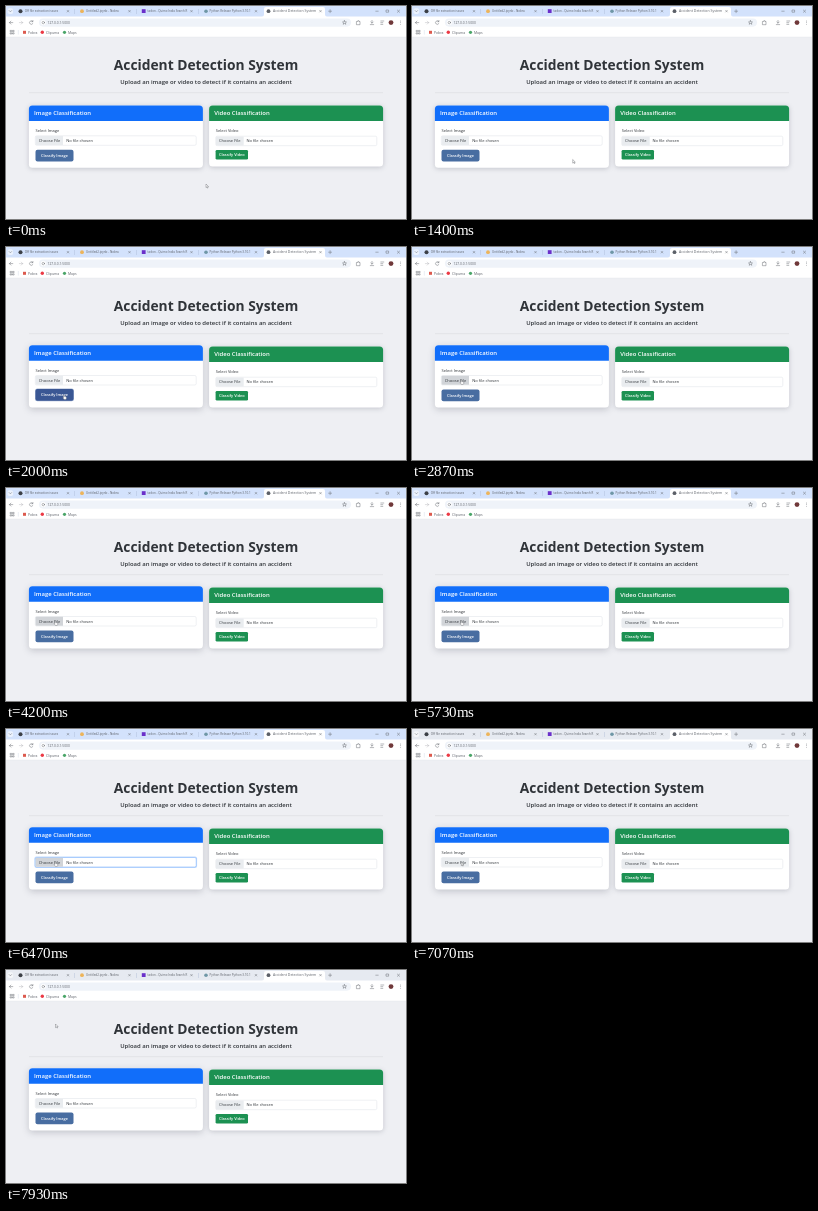
Write an HTML page that moves like this. It is 400 by 213 pixels and loops after 8000 ms.

```html
<!DOCTYPE html>
<html lang="en">
<head>
<meta charset="utf-8">
<title>Accident Detection System</title>
<style>
  html, body { margin: 0; width: 100%; height: 100%; overflow: hidden; background: #eeeff3; }
  svg { display: block; width: 100%; height: 100%; }
  text { font-family: "Open Sans", "Noto Sans", sans-serif; fill: #303439; }
  #browser text { fill: #5c6068; }
  .bold { font-weight: 700; }
  .semi { font-weight: 600; }
  .white { fill: #fff; }
  .icon { fill: none; stroke: #6a6e75; stroke-width: .5; stroke-linecap: round; stroke-linejoin: round; }
  .card { filter: drop-shadow(0 1.8px 2.9px rgba(20, 25, 45, .2)); }
</style>
</head>
<body>
<svg viewBox="0 0 400 213" preserveAspectRatio="none">
  <rect width="400" height="213" fill="#eeeff3"/>

  <g id="browser">
    <rect id="strip" width="400" height="14"/>
    <path d="M0 10.5H256Q258 10.5 258 8.5V3Q258 1 260 1H317Q319 1 319 3V8.5Q319 10.5 321 10.5H400V31H0Z" fill="#fff"/>
    <rect x="1.5" y="2.2" width="5.6" height="5.8" rx="1.8" fill="#fff" opacity=".55"/>
    <path class="icon" d="M3.2 4.6l1.2 1.2 1.2-1.2M322.6 5.2h3M324.1 3.7v3M369.8 5.2h2.4M380.4 4h2.2v2.2h-2.2z"/>
    <path d="M68.5 3v5M130.5 3v5M192.5 3v5" stroke="#a9b9d3" stroke-width=".4"/>
    <circle cx="14.5" cy="5.2" r="2" fill="#3c4047"/>
    <circle cx="76" cy="5.2" r="1.9" fill="#edb45a"/>
    <rect x="135.8" y="3.2" width="3.8" height="3.8" fill="#6a2fca"/>
    <circle cx="200" cy="5.2" r="1.8" fill="#6f97a6"/>
    <circle cx="262.5" cy="5.2" r="1.9" fill="#5c6068"/>

    <rect x="33" y="12.5" width="312" height="8.2" rx="4.1" fill="#eff3f9"/>
    <circle cx="37.3" cy="16.6" r="2.5" fill="#fff"/>
    <circle class="icon" cx="37.3" cy="16.6" r="1.2"/>
    <path class="icon" d="M6.8 16.6H3.4M4.9 15.1l-1.5 1.5 1.5 1.5M26.8 15.5a1.8 1.8 0 1 0 .1 2M26.9 14.4v1.3h-1.3
      M338.5 14.6l.6 1.3 1.4.1-1.1.9.4 1.4-1.3-.8-1.3.8.4-1.4-1.1-.9 1.4-.1z
      M350.8 15.5h1v-.8h1.2v.8h1v3.2h-3.2zM366 14.4v2.6M364.8 16l1.2 1.2 1.2-1.2M364.3 18.6h3.4M374.8 15h3M374.8 16.7h2M374.8 18.4h2"/>
    <path class="icon" opacity=".45" d="M13.3 16.6h3.4M15.2 15.1l1.5 1.5-1.5 1.5"/>
    <circle cx="385" cy="16.6" r="2.4" fill="#70393a"/>
    <g fill="#5c6068"><circle cx="394.5" cy="15" r=".4"/><circle cx="394.5" cy="16.6" r=".4"/><circle cx="394.5" cy="18.2" r=".4"/></g>

    <path class="icon" d="M4.5 24.4h1.2v1.2H4.5zM6.9 24.4h1.2v1.2H6.9zM4.5 26.8h1.2V28H4.5zM6.9 26.8h1.2V28H6.9z"/>
    <path d="M12.3 24v4.5" stroke="#d2dae8" stroke-width=".5"/>
    <rect x="17" y="24.8" width="3" height="3" fill="#dc5a4e"/>
    <circle cx="36.3" cy="26.3" r="1.7" fill="#ec3a45"/>
    <circle cx="58.5" cy="26.3" r="1.6" fill="#4aa568"/>
    <path d="M0 31.1H400" stroke="#e3e5ea" stroke-width=".4"/>
  </g>

  <path d="M23 86.7H377" stroke="#d4d6db" stroke-width=".5"/>

  <g id="imageCard">
    <rect id="imageShape" class="card" x="22.9" y="99.5" width="174" height="62.2" rx="3.5" fill="#fff"/>
    <path d="M22.9 115V103Q22.9 99.5 26.4 99.5H193.4Q196.9 99.5 196.9 103V115Z" fill="#116efa"/>
    <rect id="ring" x="28.4" y="128.9" width="162.7" height="11.3" rx="2" fill="#c2dbfe"/>
    <rect id="field" x="29.3" y="129.8" width="160.9" height="9.5" rx="1.4" fill="#fff" stroke-width=".5"/>
    <path id="choose" d="M57 130V139H30.7Q29.6 139 29.6 138V131Q29.6 130 30.7 130Z"/>
    <g id="submit">
      <rect id="buttonRing" x="29" y="143.3" width="39" height="12.6" rx="2.5" fill="#a3b4d2"/>
      <rect id="button" x="29.5" y="143.8" width="38" height="11.7" rx="2"/>
    </g>
  </g>

  <g id="videoCard">
    <rect class="card" x="203.1" y="99.5" width="174" height="61" rx="3.5" fill="#fff"/>
    <path d="M203.1 115V103Q203.1 99.5 206.6 99.5H373.6Q377.1 99.5 377.1 103V115Z" fill="#1c9152"/>
    <rect x="209.8" y="130.2" width="161" height="9.5" rx="1.4" fill="#fff" stroke="#dde1e6" stroke-width=".5"/>
    <path d="M237.7 130.4V139.5H211.2Q210 139.5 210 138.4V131.4Q210 130.4 211.2 130.4Z" fill="#e9ecef"/>
    <rect x="209.6" y="143.9" width="32.4" height="9.7" rx="1.4" fill="#1c9152"/>
  </g>

  <g id="cursor" stroke="#4c4f55" stroke-width=".4" stroke-linejoin="round" fill="#fff">
    <path id="arrow" d="M0 0V4.1L1 3.2L1.7 4.7L2.3 4.4L1.7 3H3Z"/>
    <path id="hand" d="M-.5 .4Q0-.4 .5 .4V1.7Q1 1.4 1.3 1.9Q1.8 1.6 2.1 2.1Q2.7 2 2.8 2.7V3.7Q2.7 4.6 2.2 5H.1Q-.4 4.2-1.4 3.1Q-1.3 2.4-.5 2.9Z"/>
  </g>
</svg>
<script>
const $ = id => document.getElementById(id);
const svg = document.querySelector("svg");

function label(parent, x, y, size, content, className = "") {
  const node = document.createElementNS(svg.namespaceURI, "text");
  node.setAttribute("x", x);
  node.setAttribute("y", y);
  node.setAttribute("font-size", size);
  node.setAttribute("class", className);
  node.textContent = content;
  parent.append(node);
  return node;
}

function closeIcon(x, y, r) {
  const path = document.createElementNS(svg.namespaceURI, "path");
  path.setAttribute("class", "icon");
  path.setAttribute("d", `M${x - r} ${y - r}l${2 * r} ${2 * r}m0 ${-2 * r}l${-2 * r} ${2 * r}`);
  $("browser").append(path);
}

const browser = $("browser");
label(browser, 18.7, 6.4, 3, "Off file extraction issues");
label(browser, 80, 6.4, 3, "Untitled2.ipynb - Nobra");
label(browser, 141.5, 6.4, 2.9, "tavlon - Quimo India Search R");
label(browser, 203.5, 6.4, 3, "Python Release Python 3.10.1");
label(browser, 267, 6.4, 3.5, "Accident Detection System");
[62, 123.5, 185.5, 250, 314.5].forEach(x => closeIcon(x, 5.2, .8));
closeIcon(392.5, 5.2, 1.1);
label(browser, 41.5, 17.8, 3.3, "127.0.0.1:5000");
label(browser, 22, 27.5, 3.4, "Pobra");
label(browser, 40, 27.5, 3.4, "Clipuma");
label(browser, 62, 27.5, 3.4, "Maps");

const title = label(svg, 200, 64.1, 13.8, "Accident Detection System", "bold");
const subtitle = label(svg, 200, 77.9, 5.95, "Upload an image or video to detect if it contains an accident", "semi");
[title, subtitle].forEach(node => node.setAttribute("text-anchor", "middle"));

function cardText(card, x, kind) {
  label(card, x, 109.3, 5.95, `${kind} Classification`, "semi white");
  label(card, x + 1.5, 126.3, 4.05, `Select ${kind}`);
  label(card, x + 4.8, 136.3, 4.05, "Choose File");
  label(card, x + 32.2, 136.3, 4.05, "No file chosen");
}
cardText($("imageCard"), 28, "Image");
cardText($("videoCard"), 208.2, "Video");
label($("submit"), 35, 151.1, 3.95, "Classify Image", "semi white");
label($("videoCard"), 213, 150.2, 3.9, "Classify Video", "semi white");
svg.append($("cursor"));

const LOOP = 8000, TICK = 200 / 3;
const HOVER_CARD = 1430, HOVER_BUTTON = 1800, LEAVE_BUTTON = 2300, HOVER_CHOOSE = 2400;
const FOCUS = 6300, DIALOG = 6530;

// time, x, y of the pointer tip
const pointer = [
  [0, 200, 178], [1333, 200, 178], [1400, 160.7, 153.5], [1867, 60.5, 148],
  [2000, 58, 148], [2267, 57.5, 147.5], [2467, 50, 136], [2733, 50, 136],
  [2867, 49.3, 133], [7400, 49.3, 133], [7933, 49.5, 54]
];

const progress = (t, start, length) => Math.min(1, Math.max(0, (t - start) / length));
const smooth = p => p * p * (3 - 2 * p);

function pointerAt(t) {
  const next = pointer.findIndex(key => key[0] > t);
  if (next < 0) return pointer.at(-1).slice(1);
  const [t0, x0, y0] = pointer[next - 1], [t1, x1, y1] = pointer[next];
  const p = smooth((t - t0) / (t1 - t0));
  return [x0 + (x1 - x0) * p, y0 + (y1 - y0) * p];
}

function mix(a, b, p) {
  return `rgb(${a.map((v, i) => Math.round(v + (b[i] - v) * p))})`;
}

function draw(now) {
  const t = Math.floor((now % LOOP + 4) / TICK) * TICK;
  const lift = smooth(progress(t, HOVER_CARD, 300));
  const press = progress(t, HOVER_BUTTON, 150) - progress(t, LEAVE_BUTTON, 150);
  const choose = progress(t, HOVER_CHOOSE, 150) - progress(t, DIALOG, 150);
  const focus = progress(t, FOCUS, 150) - progress(t, DIALOG, 150);
  const [x, y] = pointerAt(t);
  const overControl = t >= HOVER_BUTTON && t < DIALOG;

  $("imageCard").setAttribute("transform", `translate(0 ${-1.3 * lift})`);
  $("imageShape").style.filter =
    `drop-shadow(0 ${1.8 + lift}px ${2.9 + .6 * lift}px rgba(20,25,45,.2))`;
  $("submit").setAttribute("transform", `translate(0 ${-.4 * press})`);
  $("button").setAttribute("fill", mix([72, 109, 161], [58, 87, 148], press));
  $("buttonRing").setAttribute("opacity", press);
  $("choose").setAttribute("fill", mix([233, 236, 239], [209, 212, 216], choose));
  $("field").setAttribute("stroke", mix([221, 225, 230], [112, 170, 250], focus));
  $("ring").setAttribute("opacity", focus);
  $("strip").setAttribute("fill", t < DIALOG ? "#d3e2fc" : "#e6eaf1");
  $("cursor").setAttribute("transform", `translate(${x} ${y}) scale(.88)`);
  $("hand").style.display = overControl ? "" : "none";
  $("arrow").style.display = overControl ? "none" : "";
}

const start = performance.now();
function frame() {
  draw(performance.now() - start);
  requestAnimationFrame(frame);
}
frame();
</script>
</body>
</html>
```
